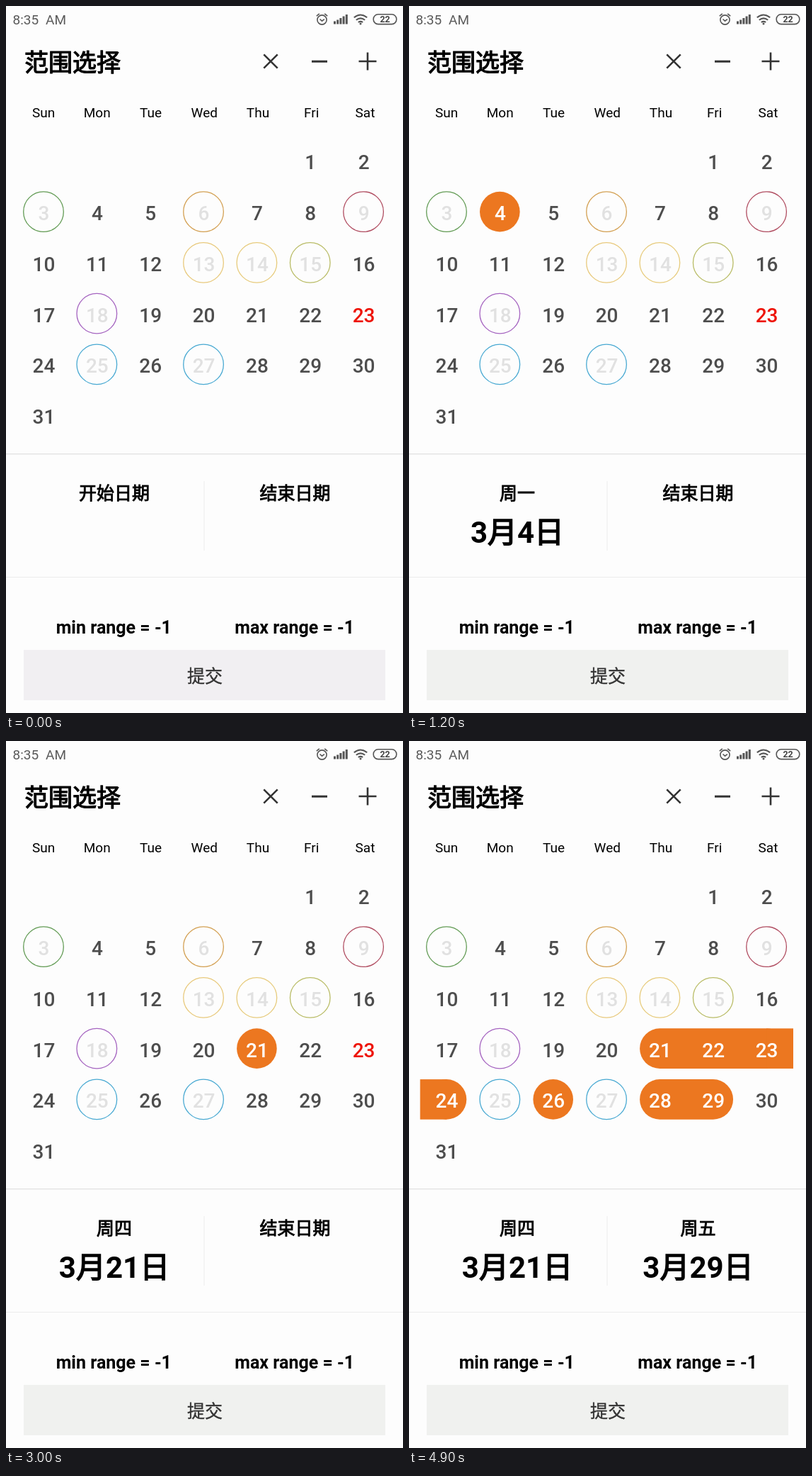
Write an HTML page that moves like this. It is 561 px wide and 997 px high and loops after 5000 ms.

```html
<!DOCTYPE html>
<html lang="zh-CN">
<head>
<meta charset="utf-8">
<title>范围选择</title>
<style>
html, body { margin: 0; width: 100%; height: 100%; overflow: hidden; background: #fdfdfd; }
svg { display: block; width: 561px; height: 997px; font-family: Roboto, "Noto Sans CJK SC", "Noto Sans CJK", sans-serif; }
.mid text, text.mid { text-anchor: middle; }
.day { font-size: 28px; font-weight: 500; fill: #4d4d4d; }
.off { fill: #e1e1e1; }
.today { fill: #ee1408; }
.picked { fill: #fff; }
.week { font-size: 19px; }
.status { font-size: 19px; fill: #5a5a5a; }
.heavy { stroke: #000; stroke-width: .036em; font-weight: 400; }
.title { font-size: 34px; }
.label { font-size: 25px; }
.date { font-size: 42px; font-weight: 700; }
.limit { font-size: 25px; font-weight: 700; }
.submit { font-size: 25px; fill: #333; stroke: #333; stroke-width: .4; }
.line { fill: none; stroke: #333; stroke-width: 2.6; }
.pill { fill: #ec7720; }
.button { fill: #f0f1ef; animation: tint 5s step-end infinite; }
.state { opacity: 0; animation: 5s step-end infinite; }
.s0 { animation-name: idle; }
.s1 { animation-name: first; }
.s2 { animation-name: firstRange; }
.s3 { animation-name: second; }
.s4 { animation-name: secondRange; }
.ripple { fill: #ebebeb; opacity: 0; animation: ripple 5s step-end infinite; }
@keyframes tint { 0% { fill: #f1eff2 } 12% { fill: #f0f1ef } }
@keyframes idle { 0% { opacity: 1 } 12% { opacity: 0 } 44% { opacity: 1 } 54% { opacity: 0 } }
@keyframes first { 12% { opacity: 1 } 36% { opacity: 0 } }
@keyframes firstRange { 36% { opacity: 1 } 44% { opacity: 0 } }
@keyframes second { 54% { opacity: 1 } 88% { opacity: 0 } }
@keyframes secondRange { 88% { opacity: 1 } 100% { opacity: 0 } }
@keyframes ripple {
  44% { opacity: 1; transform: translate(371px, 72.5px) }
  46% { opacity: .5; transform: translate(373px, 76px) scale(1.3) }
  48% { opacity: 0 }
}
</style>
</head>
<body>
<svg id="stage" viewBox="0 0 561 997"></svg>
<script>
const R = 28.3, LEFT = 15.7, RIGHT = 543, FIRST_COL = 5, TODAY = 23;
const WEEK = ['Sun', 'Mon', 'Tue', 'Wed', 'Thu', 'Fri', 'Sat'];
const HAN_DAYS = '日一二三四五六';
const RINGS = {
  3: '#629b54', 6: '#d3a052', 9: '#b04c60', 13: '#e8c97c', 14: '#e7cb7c',
  15: '#b9bc66', 18: '#a564c0', 25: '#48a9d2', 27: '#48a9d2'
};
const days = Array.from({ length: 31 }, (_, i) => i + 1);

const col = d => (d + FIRST_COL - 1) % 7;
const row = d => Math.floor((d + FIRST_COL - 1) / 7);
const cx = d => 53 + 75.35 * col(d);
const cy = d => 218.4 + 71.75 * row(d);

const text = (s, x, y, cls) => `<text x="${x}" y="${y}" class="${cls}">${s}</text>`;
const rect = (x, y, w, h, attrs) => `<rect x="${x}" y="${y}" width="${w}" height="${h}" ${attrs}/>`;
const path = (d, width = 2.6) => `<path class="line" d="${d}" style="stroke-width:${width}"/>`;
const dayText = (d, cls = '') => text(d, cx(d) + .5, cy(d) + 11.9, `mid day ${cls}`);

function statusBar() {
  const bars = [4, 6, 8.5, 11, 13.5]
    .map((h, i) => rect(463 + i * 4.2, 25.5 - h, 3, h, 'fill="#555"')).join('');
  return text('8:35', 9.5, 26, 'status') + text('AM', 56, 26, 'status') + bars +
    `<g stroke="#555" fill="none" stroke-width="1.6">
      <circle cx="446.5" cy="19.5" r="6.6"/>
      <path d="M438.8 14.2l4-3.4M454.2 14.2l-4-3.4M443.5 18.5l3 2.7 3.4-2.6"/>
      <path stroke-width="2.1" d="M491.8 16.3q9.2-7.6 18.4 0M494.8 19.8q6.2-5 12.4 0M497.8 23q3.2-2.4 6.4 0"/>
      <rect x="519.2" y="11.8" width="32.6" height="13.8" rx="6.6"/>
    </g>
    <circle cx="501" cy="25" r="1.5" fill="#555"/>
    <text x="535.6" y="23.3" class="mid" font-size="12.5" font-weight="700" fill="#444">22</text>`;
}

function calendar() {
  const head = WEEK.map((w, i) => text(w, 53 + 75.75 * i, 157, 'mid week')).join('');
  const rings = Object.entries(RINGS).map(([d, c]) =>
    `<circle cx="${cx(+d)}" cy="${cy(+d)}" r="${R}" fill="none" stroke="${c}" stroke-width="1.3"/>`).join('');
  const nums = days.map(d => dayText(d, RINGS[d] ? 'off' : d === TODAY ? 'today' : '')).join('');
  return head + rings + nums;
}

// One pill per unbroken run in a row; a run that wraps reaches the edge.
function selection(from, to) {
  const on = d => d >= from && d <= to && !RINGS[d];
  const joins = (a, b) => on(a) && on(b) && row(a) === row(b);
  let out = '';
  for (const d of days.filter(on)) {
    if (joins(d - 1, d)) continue;
    let end = d;
    while (joins(end, end + 1)) end++;
    const x1 = cx(d), x2 = cx(end), y = cy(d) - R;
    out += rect(x1 - R, y, x2 - x1 + 2 * R, 2 * R, `rx="${R}" class="pill"`);
    if (on(d - 1)) out += rect(LEFT, y, x1 - LEFT, 2 * R, 'class="pill"');
    if (on(end + 1)) out += rect(x2, y, RIGHT - x2, 2 * R, 'class="pill"');
  }
  return out + days.filter(on).map(d => dayText(d, 'picked')).join('');
}

function dateInfo(x, d, empty) {
  if (!d) return text(empty, x, 696, 'mid label heavy');
  const han = s => `<tspan class="heavy">${s}</tspan>`;
  return text('周' + HAN_DAYS[col(d)], x, 696, 'mid label heavy') +
    text('3' + han('月') + d + han('日'), x, 756.5, 'mid date');
}

function state(i, from, to) {
  return `<g class="state s${i}">` + (from ? selection(from, to || from) : '') +
    dateInfo(153, from, '开始日期') + dateInfo(408.5, to, '结束日期') + '</g>';
}

document.getElementById('stage').innerHTML =
  statusBar() +
  text('范围选择', 26, 92, 'title heavy') +
  '<circle class="ripple" r="22.5"/>' +
  path('M364.3 68.3l19.4 19.4M383.7 68.3l-19.4 19.4') +
  path('M432 78.2h22', 3) +
  path('M498.5 78h25M511 65.5v25') +
  calendar() +
  rect(0, 631, 561, 1.4, 'fill="#e3e3e3"') +
  rect(0, 805, 561, 1, 'fill="#ececec"') +
  rect(279.5, 670, 1, 98, 'fill="#ebebeb"') +
  text('min range = -1', 152.3, 885, 'mid limit') +
  text('max range = -1', 407.7, 885, 'mid limit') +
  rect(25, 908, 511, 71, 'class="button"') +
  text('提交', 281, 953.5, 'mid submit') +
  [[], [4], [4, 21], [21], [21, 29]].map((r, i) => state(i, ...r)).join('');
</script>
</body>
</html>
```
